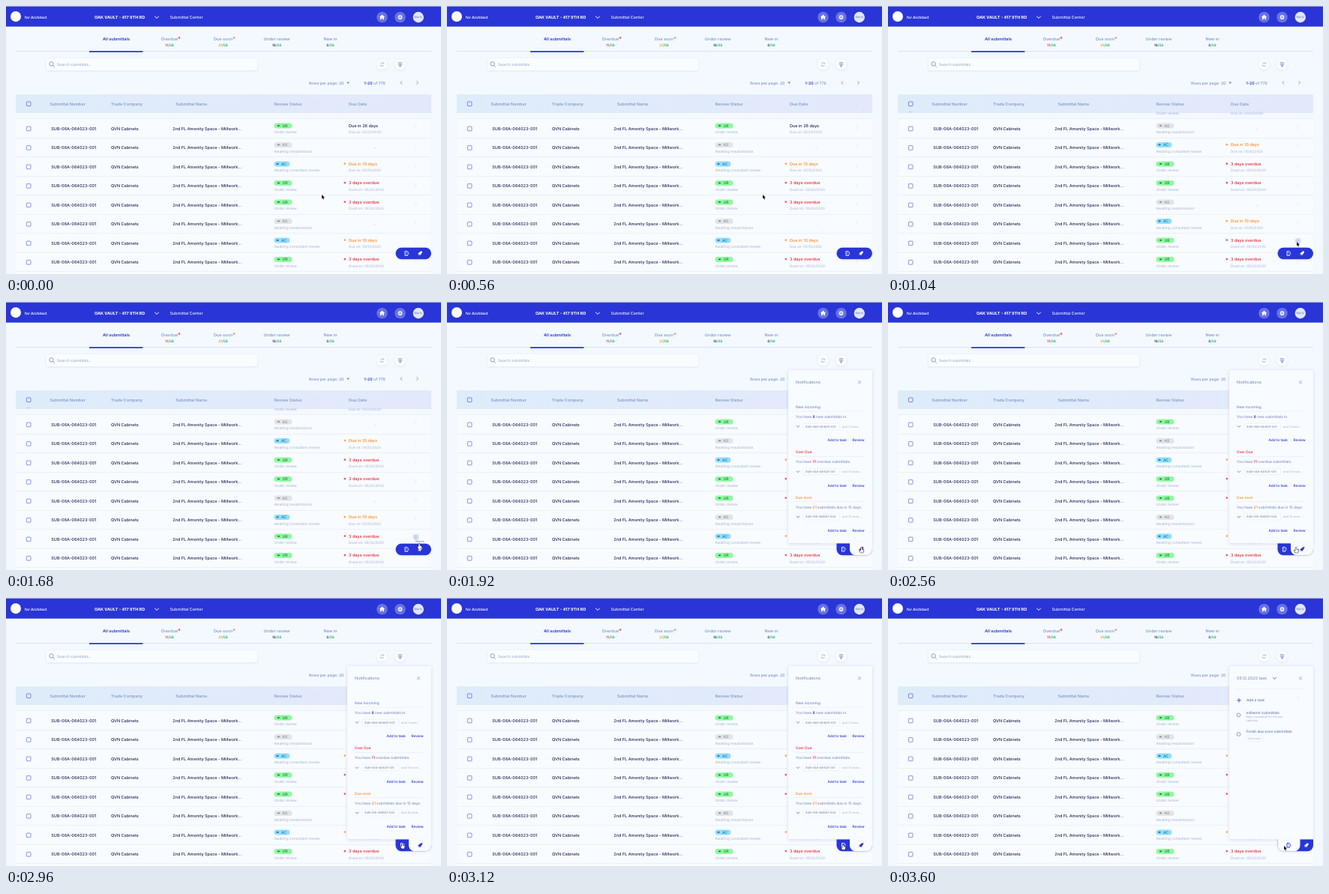
Animation of 580 by 358 pixels, one loop 3680 ms. Source, as an HTML page with a canvas:

```html
<!DOCTYPE html>
<html lang="en">
<head>
<meta charset="utf-8">
<title>Submittal Center</title>
<style>
html, body { margin: 0; width: 100%; height: 100%; overflow: hidden; background: #f3f9ff; }
canvas { display: block; width: 580px; height: 358px; }
</style>
</head>
<body>
<canvas id="stage"></canvas>
<script>
const W = 580, H = 358, LOOP = 3680, STEP = 80;
const canvas = document.getElementById('stage');
const ctx = canvas.getContext('2d');
const dpr = window.devicePixelRatio || 1;
canvas.width = W * dpr;
canvas.height = H * dpr;

const C = {
  blue: '#2935d6', navy: '#232a55', label: '#7d92c6', faint: '#a3b0d0', line: '#e1e7f1',
  red: '#f3202f', orange: '#ff8a1e', green: '#22b455', page: '#f3f9ff', card: '#f8fbff',
  soft: '#6771e5', check: '#5f6be2'
};
const PITCH = 25.5, FIRST_ROW = 163.9;

// y is the optical middle of the capitals; returns the end of the text
function text(str, x, y, size, color, weight = 400, align = 'left') {
  ctx.font = `${weight} ${size}px Inter, sans-serif`;
  ctx.textAlign = align;
  ctx.fillStyle = color;
  ctx.fillText(str, x, y + size * 0.36);
  return x + ctx.measureText(str).width;
}

// parts: [string, color, weight]
function richText(parts, x, y, size) {
  for (const [str, color, weight] of parts) x = text(str, x, y, size, color, weight);
}

function box(x, y, w, h, r, fill, stroke, lineWidth = 0.6) {
  ctx.beginPath();
  ctx.roundRect(x, y, w, h, r);
  if (fill) { ctx.fillStyle = fill; ctx.fill(); }
  if (stroke) { ctx.strokeStyle = stroke; ctx.lineWidth = lineWidth; ctx.stroke(); }
}

function disc(x, y, r, fill, stroke, lineWidth) {
  box(x - r, y - r, r * 2, r * 2, r, fill, stroke, lineWidth);
}

function path(points, color, width = 0.8, filled = false) {
  ctx.beginPath();
  points.forEach(([x, y], i) => i ? ctx.lineTo(x, y) : ctx.moveTo(x, y));
  if (filled) {
    ctx.closePath();
    ctx.fillStyle = color;
    ctx.fill();
  } else {
    ctx.strokeStyle = color;
    ctx.lineWidth = width;
    ctx.stroke();
  }
}

function at(x, y, draw) {
  ctx.save();
  ctx.translate(x, y);
  draw();
  ctx.restore();
}

function shadowed(draw, blur = 3, color = 'rgba(90,120,190,.16)') {
  ctx.save();
  ctx.shadowColor = color;
  ctx.shadowBlur = blur * dpr;
  ctx.shadowOffsetY = 0.7 * dpr;
  draw();
  ctx.restore();
}

const chevronDown = (x, y, s, color, w) => path([[x - s, y - s / 2], [x, y + s / 2], [x + s, y - s / 2]], color, w);
const chevronSide = (x, y, dir) => path([[x - dir, y - 2], [x + dir, y], [x - dir, y + 2]], '#6478bd', 0.8);

function dots(x, y, color = '#b9c4de') {
  for (const dy of [-1.7, 0, 1.7]) disc(x, y + dy, 0.4, color);
}

function star(x, y, color) {
  for (let i = 0; i < 3; i++) {
    const a = Math.PI / 2 + i * Math.PI / 3, dx = Math.cos(a) * 1.4, dy = Math.sin(a) * 1.4;
    path([[x - dx, y - dy], [x + dx, y + dy]], color, 0.7);
  }
}

function cross(x, y) {
  path([[x - 2, y - 2], [x + 2, y + 2]], '#7182b8', 0.6);
  path([[x + 2, y - 2], [x - 2, y + 2]], '#7182b8', 0.6);
}

function docIcon(x, y, color) {
  at(x, y, () => {
    path([[1.5, 2.8], [-2.2, 2.8], [-2.2, -2.8], [0.8, -2.8], [2.2, -1.3], [2.2, 0.2]], color, 0.9);
    path([[-1, -0.6], [1, -0.6]], color, 0.6);
    path([[0, 1.2], [1.2, 2.3], [3, 0.5]], color, 0.8);
  });
}

function rocketIcon(x, y, color) {
  at(x, y, () => {
    ctx.rotate(Math.PI / 4);
    ctx.beginPath();
    ctx.ellipse(0, -0.6, 1.6, 2.9, 0, 0, 7);
    ctx.fillStyle = color;
    ctx.fill();
    path([[-1, 0], [-2.4, 2.3], [0, 1.6], [2.4, 2.3], [1, 0]], color, 0, true);
    path([[0, 2.3], [0, 3.6]], color, 0.7);
  });
}

function topBar() {
  box(0, 0.5, W, 27.1, 0, C.blue);
  disc(13, 14, 7, '#fff');
  text('for Architect', 25, 15.5, 4.9, '#fff', 600);
  text('OAK VAULT - 417 9TH RD', 118, 15, 5.5, '#fff', 700);
  chevronDown(201, 15, 2.8, '#fff', 1);
  text('Submittal Center', 218.5, 15, 5.5, '#e9edff', 500);

  disc(501.5, 15, 7.3, C.soft);
  path([[497.9, 15], [501.5, 11.6], [505.1, 15], [504, 15], [504, 18], [499, 18], [499, 15]], '#fff', 0, true);
  box(500.8, 15.8, 1.4, 2.2, 0, C.soft);

  disc(525.5, 15, 7.3, C.soft);
  for (let i = 0; i < 8; i++) at(525.5, 15, () => {
    ctx.rotate(i * Math.PI / 4);
    box(-0.6, -3.2, 1.2, 1.5, 0, '#fff');
  });
  disc(525.5, 15, 1.7, null, '#fff', 1.1);

  disc(549.8, 15, 7.2, '#dfe6fd');
  text('Marlo', 549.8, 15, 3.8, '#7784ce', 500, 'center');
}

function tabs() {
  box(13, 60.3, 554, 0.7, 0, '#d3deee');
  box(111, 60, 71.5, 1.8, 0.5, C.blue);
  text('All submittals', 147, 44.5, 5.5, C.blue, 600, 'center');
  const items = [
    ['Overdue', 218, '11', C.red], ['Due soon', 289.5, '21', C.orange],
    ['Under review', 361, '18', '#34406f'], ['New in', 432.5, '8', '#34406f']
  ];
  for (const [name, x, count, color] of items) {
    text(name, x, 44.5, 5.5, C.label, 500, 'center');
    ctx.font = '600 4.6px Inter, sans-serif';
    const left = x - ctx.measureText(count + '/58').width / 2;
    richText([[count, color, 600], ['/58', C.green, 600]], left, 52, 4.6);
  }
  star(231, 42.5, C.red);
  star(304, 42.5, '#ff6a3c');
}

function toolbar() {
  shadowed(() => box(54, 70, 281, 16, 2, '#fafdff'));
  disc(60.6, 77.3, 2.7, null, '#7183bb', 0.8);
  path([[62.5, 79.3], [65, 81.8]], '#7183bb', 0.8);
  text('Search submittals...', 68, 78.3, 5, '#95a3c6');

  for (const x of [501.5, 525.5]) shadowed(() => disc(x, 78, 7.3, '#fafdff'));
  ctx.strokeStyle = '#7b8cc8';
  ctx.lineWidth = 0.6;
  for (const start of [0.3, 3.44]) {
    ctx.beginPath();
    ctx.arc(501.5, 78, 2.3, start, start + 2.4);
    ctx.stroke();
  }
  path([[502.8, 76.8], [504, 76.8], [504, 75.6]], '#7b8cc8', 0.5);
  path([[500.2, 79.2], [499, 79.2], [499, 80.4]], '#7b8cc8', 0.5);
  box(523.2, 75.4, 4.6, 3.6, 0.6, null, '#6478bd', 0.6);
  disc(525.5, 77, 0.8, '#6478bd');
  path([[525.5, 78], [525.5, 80.8]], '#6478bd', 0.8);
  path([[524, 80.8], [527, 80.8]], '#6478bd', 0.6);

  text('Rows per page: 20', 404, 102.7, 5.2, C.label, 500);
  path([[454.3, 101.5], [458.1, 101.5], [456.2, 104]], '#7183bb', 0, true);
  richText([['1-20', C.blue, 600], [' of 776', C.label, 500]], 477.5, 102.7, 5.2);
  chevronSide(527, 102.5, -1);
  chevronSide(548.5, 102.5, 1);
}

function tableHead() {
  const fill = ctx.createLinearGradient(13, 0, 567, 0);
  fill.addColorStop(0, '#deecfa');
  fill.addColorStop(1, '#e3e9fb');
  box(13, 118, 554, 25, 0, fill);
  box(27.4, 127.9, 5.6, 5.6, 0.6, null, C.check, 0.8);
  const columns = [['Submittal Number', 58.5], ['Trade Company', 140], ['Submittal Name', 226.5],
    ['Review Status', 357.5], ['Due Date', 457]];
  for (const [name, x] of columns) text(name, x, 131, 5.5, C.label, 500);
  dots(546.5, 131);
}

const STATUS = {
  UR: { note: 'Under review', fill: '#8ff8a2', ink: '#1f7a3c', width: 24 },
  AS: { note: 'Awaiting resubmission', fill: '#e3e4e7', ink: '#8a8d97', width: 24 },
  AC: { note: 'Awaiting consultant review', fill: '#91dffc', ink: '#2173a8', width: 21 }
};
const SEQUENCE = ['UR', 'AS', 'AC', 'UR', 'UR', 'AS', 'AC', 'UR', 'UR', 'AS'];

function dueCell(code, index, y) {
  if (code === 'AS') return text('-', 491, y, 5, C.faint);
  const [title, note, color] = index === 0 ? ['Due in 26 days', 'Due on: 05/21/2020', C.navy]
    : code === 'AC' ? ['Due in 10 days', 'Due on: 05/15/2020', C.orange]
    : ['3 days overdue', 'Dued on: 05/02/2020', C.red];
  if (index) star(451.8, y - 4.3, color);
  text(title, 457, y - 4, 5.5, color, 500);
  text(note, 457, y + 4.5, 4.6, C.faint);
}

function row(index, y) {
  const code = SEQUENCE[index], s = STATUS[code];
  box(13, y - 13.5, 554, 0.6, 0, C.line);
  box(27.4, y - 2.8, 5.6, 5.6, 0.6, null, C.check, 0.7);
  text('SUB-06A-064023-001', 60.3, y, 5.5, C.navy, 500);
  text('QVN Cabinets', 140, y, 5.5, C.navy, 500);
  text('2nd FL Amenity Space - Millwork...', 222.3, y, 5.5, C.navy, 500);
  box(357.5, y - 7.5, s.width, 7, 3.5, s.fill);
  const iconX = 363.5 - (24 - s.width) / 2;
  path([[iconX - 2, y - 4], [iconX + 2, y - 4]], s.ink, 0.8);
  disc(iconX, y - 4, 1.1, s.ink);
  text(code, iconX + 5, y - 4, 5, s.ink, 500);
  text(s.note, 357.5, y + 4.6, 4.8, C.faint);
  dueCell(code, index, y);
  dots(546.5, y - 1.5);
}

function rows(scroll) {
  ctx.save();
  ctx.beginPath();
  ctx.rect(0, 141.5, W, H);
  ctx.clip();
  box(13, 150, 554, 208, 0, '#f8fbff');
  SEQUENCE.forEach((_, i) => row(i, FIRST_ROW + (i - scroll) * PITCH));
  ctx.restore();
}

function launcher(panel) {
  if (!panel) {
    shadowed(() => box(519.5, 322.8, 47.5, 15.4, 7.7, C.blue));
    docIcon(534.2, 330.5, '#fff');
    rocketIcon(552.2, 330.3, '#fff');
    return;
  }
  const onTasks = panel === taskPanel;
  shadowed(() => box(519.5, 322.5, 47.5, 15.7, [0, 0, 7.7, 7.7], C.blue));
  box(onTasks ? 519.5 : 537, 321.5, 30, 16.7, [0, 0, 7.7, 7.7], C.card);
  docIcon(onTasks ? 534.2 : 528.6, 330.3, onTasks ? C.blue : '#fff');
  rocketIcon(onTasks ? 558 : 552.2, 330.3, onTasks ? '#fff' : C.blue);
  if (!onTasks) disc(554.6, 327.8, 0.9, C.red);
}

function notifications() {
  text('Notifications', 465, 107.2, 5.5, '#7182b8');
  cross(550, 107.2);
  const groups = [
    ['New Incoming', '#7486dd', '8', ' new submittals in.', 'SUB-05A-064031-001', 'and 7 more...'],
    ['Over Due', C.red, '11', ' overdue submittals.', 'SUB-03A-041021-001', 'and 10 more...'],
    ['Due soon', C.orange, '21', ' submittals due in 15 days.', 'SUB-019-066021-002', 'and 15 more ...']
  ];
  groups.forEach(([title, color, count, rest, code, more], i) => {
    const y = 140.2 + i * 60.4, ink = i ? color : C.blue;
    text(title, 465, y, 4.8, color, 500);
    box(465, y + 5.6, 91, 0.5, 0, C.line);
    richText([['You have ', '#7182b8', 400], [count, ink, 600], [rest, '#7182b8', 400]], 465, y + 12.9, 4.9);
    chevronDown(468, y + 26, 2.1, '#4653dc', 0.7);
    box(475, y + 22, 48.5, 8, 1, '#fbfdff', '#e1e8f4', 0.5);
    text(code, 478, y + 26, 3.85, '#5e6a96');
    text(more, 527, y + 26, 3.9, C.faint);
    text('Add to task', 507.5, y + 44.6, 4.7, C.blue, 500);
    text('Review', 540.5, y + 44.6, 4.7, C.blue, 500);
  });
}

function taskPanel() {
  text('05.12.2020 task', 465, 107.2, 5.4, '#7182b8');
  chevronDown(515.5, 107.2, 2.3, '#4653dc', 0.8);
  cross(550, 107.2);
  box(465, 121, 91, 0.5, 0, '#e6ecf6');
  path([[465.2, 136.7], [470.8, 136.7]], C.blue, 0.8);
  path([[468, 133.9], [468, 139.5]], C.blue, 0.8);
  text('Add a task', 478, 136.7, 4.8, '#6c7cb4', 500);
  dots(546.5, 134);
  for (const y of [156.3, 182]) disc(467.5, y, 2.4, null, '#6478cf', 0.7);
  text('millwork submittals', 477.5, 153.2, 4.8, '#6c7cb4', 500);
  text('Major submittal for kitchen', 477.5, 159, 3.9, C.faint);
  text('cabinets', 477.5, 163.5, 3.9, C.faint);
  text('Finish due soon submittals', 477.5, 178.3, 4.8, '#6c7cb4', 500);
  box(477.5, 184, 23, 7.5, 1, null, '#e1e8f4', 0.5);
  text('Due soon', 480.5, 187.8, 3.8, C.faint);
}

function scene(scroll, panel) {
  box(0, 0, W, H, 0, C.page);
  topBar();
  tabs();
  toolbar();
  tableHead();
  rows(scroll);
  if (panel) shadowed(() => box(455, 91, 112, 231.5, 2, C.card), 4, 'rgba(70,95,170,.22)');
  launcher(panel);
  if (panel) panel();
}

const ARROW = [[0, 0], [0, 5.6], [1.3, 4.5], [2.2, 6.6], [3.2, 6.1], [2.3, 4.1], [4, 4]];
const HAND = [[-0.7, 0], [0.5, 0], [0.7, 2.4], [3, 3], [3, 5], [2.2, 6.8], [-0.8, 6.8], [-2.4, 4.2], [-1.8, 3.6], [-0.7, 4.4]];

function pointer([x, y], overButton) {
  at(x, y, () => {
    const shape = overButton ? HAND : ARROW;
    const [fill, edge] = overButton ? ['#fff', '#15161c'] : ['#15161c', '#fff'];
    path([...shape, shape[0]], edge, 1.1);
    path(shape, fill, 0, true);
  });
}

function ease(t, start, end) {
  const p = Math.min(1, Math.max(0, (t - start) / (end - start)));
  return p * p * (3 - 2 * p);
}

// [start, end, x, y]
const MOVES = [[720, 1000, 545, 315], [1280, 1600, 551, 323], [1680, 1840, 552.5, 328],
  [2400, 2800, 528.5, 328], [3040, 3200, 528, 331]];
const OPEN = 1920, SWITCH = 3200;

function pointerAt(t) {
  return MOVES.reduce(([x, y], [start, end, toX, toY]) => {
    const p = ease(t, start, end);
    return [x + (toX - x) * p, y + (toY - y) * p];
  }, [421, 252]);
}

function hoverHint(t) {
  if (t >= 960) {
    disc(546.7, 314, 4, '#d3dcf9');
    dots(546.7, 314, '#5a6bd0');
  }
  if (t >= 1520) text('Notice', 552, 319.5, 3.7, '#6f7796', 500, 'center');
}

function render(t) {
  ctx.setTransform(dpr, 0, 0, dpr, 0, 0);
  ctx.textRendering = 'geometricPrecision';
  if (t < OPEN) {
    scene(ease(t, 600, 840));
    hoverHint(t);
  } else {
    scene(0, t < SWITCH ? notifications : taskPanel);
  }
  pointer(pointerAt(t), t >= 1520 && t < SWITCH);
}

const origin = performance.now();
function tick() {
  const t = (performance.now() - origin) % LOOP;
  render(Math.floor(t / STEP) * STEP);
  requestAnimationFrame(tick);
}
tick();
</script>
</body>
</html>
```
